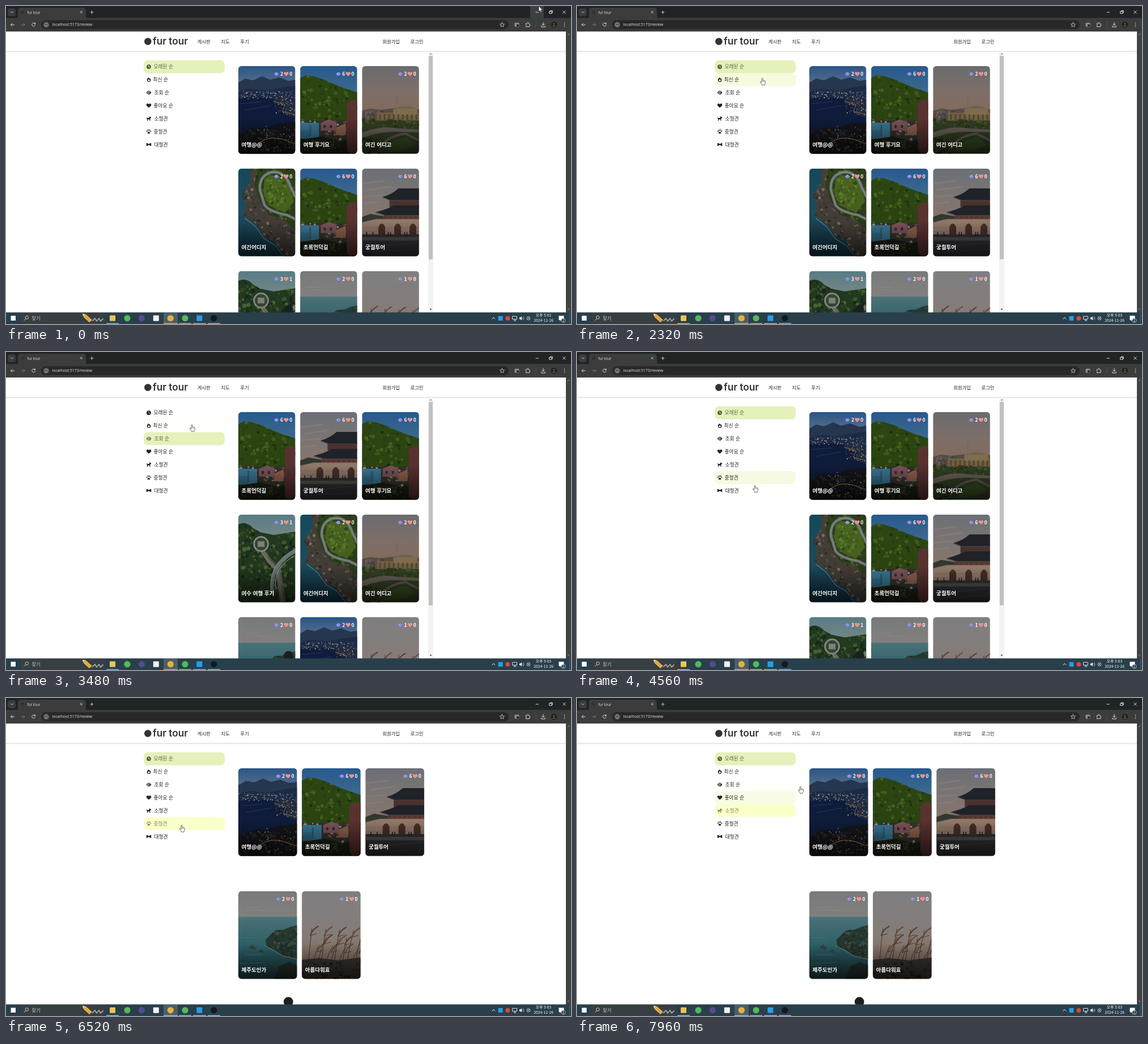
Recreate the animation shown at these times as an HTML page. Size 997 by 561 pixels, loop 8000 ms.

```html
<!DOCTYPE html>
<html lang="ko">
<head>
<meta charset="utf-8">
<title>fur tour</title>
<style>
html, body { margin: 0; width: 100%; height: 100%; overflow: hidden; background: #fff; }
svg { display: block; }
#stage { width: 100vw; height: 100vh; }
text { font-family: "Noto Sans CJK KR", "Noto Sans CJK", "Noto Sans", sans-serif; white-space: pre; }
.ui { font-family: "Open Sans", "Noto Sans", sans-serif; }
.logo { font-family: Inter, sans-serif; font-weight: 600; }
.line { fill: none; stroke-linecap: round; stroke-linejoin: round; }
</style>
</head>
<body>
<svg id="stage" viewBox="0 0 997 561" preserveAspectRatio="none"></svg>
<script>
const LOOP = 8000, CARD_H = 154.6, SCENE_W = 104;
const stage = document.getElementById('stage');

const rect = (x, y, w, h, fill, r = 0, more = '') =>
  `<rect x="${x}" y="${y}" width="${w}" height="${h}" rx="${r}" fill="${fill}" ${more}/>`;
const dot = (x, y, r, fill, more = '') => `<circle cx="${x}" cy="${y}" r="${r}" fill="${fill}" ${more}/>`;
const path = (d, fill, more = '') => `<path d="${d}" fill="${fill}" ${more}/>`;
const line = (d, color, w = 1, more = '') => `<path class="line" d="${d}" stroke="${color}" stroke-width="${w}" ${more}/>`;
const text = (s, x, y, size, fill, more = '') => `<text x="${x}" y="${y}" font-size="${size}" fill="${fill}" ${more}>${s}</text>`;
const at = (x, y, s, scale = 1) => `<g transform="translate(${x} ${y}) scale(${scale})">${s}</g>`;
const fade = (id, ...stops) => `<linearGradient id="${id}" x1="0" y1="0" x2="0" y2="1">` +
  stops.map(([o, c, a = 1]) => `<stop offset="${o}" stop-color="${c}" stop-opacity="${a}"/>`).join('') + '</linearGradient>';

function random(seed) {
  return () => (seed = (seed * 16807) % 2147483647) / 2147483647;
}
function specks(n, x, y, w, h, colors, size, seed) {
  const rnd = random(seed * 7919);
  let s = '';
  for (let i = 0; i < n; i++) {
    const px = x + rnd() * w, py = y + rnd() * h, r = size * (0.5 + rnd());
    s += dot(px.toFixed(1), py.toFixed(1), r.toFixed(1), colors[Math.floor(rnd() * colors.length)]);
  }
  return s;
}
// A filled outline whose texture stays inside it
const textured = (id, d, fill, body) =>
  path(d, fill) + `<clipPath id="${id}"><path d="${d}"/></clipPath><g clip-path="url(#${id})">${body}</g>`;

// ---- photo scenes, 104 x 155 ----
const lights = ['#b98a4a', '#d8b878', '#8a6436', '#7f8ba0'];
const leaves = ['#26400f', '#3f5d1b', '#2e4a12', '#1b300e', '#4a6420'];
const scenes = {
  night: rect(0, 0, 104, 155, 'url(#nightSky)') +
    path('M0 30L14 22L28 25L44 18L58 24L74 20L90 26L104 24V60H0Z', '#26374f') +
    path('M0 44L22 40L50 43L78 38L104 34V62H0Z', '#1d2b47') +
    path('M0 58Q30 52 62 57L104 62V155H0Z', '#0f1d3d') +
    specks(110, 0, 43, 104, 15, ['#5d6f8c', '#8893a5', '#a9875a', '#3c4c6a', '#c9b389'], .8, 3) +
    path('M64 58H104V92L82 84L86 72L64 66Z', '#222c42') + specks(60, 66, 56, 38, 30, lights, .8, 5) +
    line('M64 62L84 68L80 80L104 86', '#a9834c', .8) + line('M6 66L42 63M14 78L58 70', '#2b4166', .8) +
    path('M0 122Q22 104 48 110L70 102L104 98V155H0Z', '#15161b') +
    specks(50, 0, 112, 104, 43, ['#262a30', '#30302f', '#1b222b'], 2.2, 7) +
    specks(90, 28, 104, 76, 46, lights, .7, 9) + line('M32 142Q54 118 88 132T104 120', '#b4833f', 1.1),
  village: rect(0, 0, 104, 155, 'url(#blueSky)') +
    textured('hill', 'M0 22L12 16L26 18L44 24L62 32L82 40L104 47V112H0Z', '#2d4612', specks(170, 0, 18, 104, 94, leaves, 2.2, 4)) +
    rect(0, 96, 104, 59, '#34342e') +
    specks(90, 0, 94, 104, 40, ['#74504a', '#8b7d70', '#3a5f6d', '#5a3f32', '#a09689', '#2d3a22'], 2.1, 6) +
    rect(2, 100, 33, 27, '#3c7c99') + rect(2, 113, 17, 15, '#35708f') + rect(18, 104, 3, 20, '#2f6079') +
    path('M38 100L52 94L66 99V114H38Z', '#80565e') + path('M66 108L82 101V122H64Z', '#94644e') +
    rect(43, 104, 4, 5, '#2e3036') + rect(54, 104, 4, 5, '#2e3036') +
    path('M0 130L40 124L72 132L104 128V155H0Z', '#1c2014') + specks(40, 0, 130, 80, 22, ['#33421a', '#4a3a22', '#202818'], 2, 8) +
    rect(84, 60, 24, 95, '#5d3432', 11),
  park: rect(0, 0, 104, 155, 'url(#dusk)') +
    path('M0 79L16 75L34 77L60 74L104 76V100H0Z', '#57504a') + specks(30, 0, 78, 40, 16, ['#6d6257', '#47433f'], 1.6, 11) +
    rect(28, 82, 76, 15, '#766345') + rect(57, 75, 42, 12, '#86714d') + path('M60 75Q78 66 96 75Z', '#6e665b') +
    [...Array(9)].map((_, i) => rect(32 + i * 8, 85, 3, 10, '#574833')).join('') + rect(62, 52, 2, 40, '#776c5f') +
    rect(0, 96, 104, 59, '#364226') + specks(90, 0, 93, 104, 20, ['#2a3719', '#46552c', '#353f22'], 2.2, 12) +
    path('M0 118Q34 104 66 110L104 112V117L68 116Q34 114 0 128Z', '#6d655d') +
    line('M28 155Q36 126 78 119L104 132', '#665d56', 4) + path('M44 146Q54 128 82 126L96 139Q74 152 44 150Z', '#3a5424') +
    specks(55, 0, 128, 32, 26, ['#25301a', '#37451f'], 2.6, 13),
  coast: rect(0, 0, 104, 155, 'url(#sea)') +
    textured('rocks', 'M22 0H104V155H84L66 128L48 120L34 98L12 84L16 62L8 48L24 22Z', '#463f38',
      specks(260, 6, 0, 98, 155, ['#6a5d51', '#3a3632', '#2b2d2c', '#7a6e61', '#333c2a', '#4a4d4b'], 1.9, 16)) +
    textured('wood', 'M36 0H104V112L84 90L56 82L40 58L30 28Z', '#2c3e1c', specks(130, 28, 0, 76, 112, leaves, 2.1, 18)) +
    path('M48 18Q68 4 90 24L100 58L84 78L54 64L46 42Z', '#48641f') +
    specks(60, 54, 20, 34, 46, ['#587726', '#3b581b', '#68802f', '#30491a'], 2.2, 19) +
    line('M104 90L88 82Q56 76 48 64L40 38Q38 14 58 7Q84 2 94 32L104 52', '#6f7475', 5) +
    line('M104 90L88 82Q56 76 48 64L40 38Q38 14 58 7Q84 2 94 32L104 52', '#9a9c96', .7) +
    line('M14 88L32 102L48 124L68 136L82 155', '#8b969a', 1.4, 'opacity=".7"'),
  palace: rect(0, 0, 104, 155, 'url(#cloudy)') +
    line('M0 27L40 22M10 38L52 32M0 50L36 47M4 62L30 59', '#9a857d', 3, 'opacity=".4"') +
    path('M0 86L16 80L40 84V100H0Z', '#343a31') +
    rect(50, 54, 54, 14, '#4c3330') + path('M38 50Q54 46 66 35H104V56H52Z', '#202329') + line('M38 51L52 56H104', '#46464a', 1.2) +
    rect(40, 80, 64, 11, '#543a32') + path('M26 77Q46 72 58 65H104V82H42Z', '#202329') + line('M26 78L42 83H104', '#48484c', 1.2) +
    [...Array(7)].map((_, i) => rect(46 + i * 9, 84, 2, 7, '#7b3d31')).join('') +
    path('M0 95L26 89H104V118H0Z', '#987f6e') + line('M0 96L26 90H104M0 104H104M0 111H104', '#7c685b', .6) +
    [30.5, 58.5, 85.5].map(x => path(`M${x} 118V103Q${x + 6} 91 ${x + 12} 103V118Z`, '#49302a')).join('') +
    rect(0, 116, 104, 39, '#34343a') + path('M0 121H104V127H0Z', '#57534f') + line('M0 140L104 130M0 148L104 142', '#47474d', 1) +
    [9, 20, 47, 51, 76, 80].map(x => rect(x, 112, 1.7, 7, '#20232a', .8)).join(''),
  bridge: rect(0, 0, 104, 155, 'url(#haze)') +
    textured('forest', 'M0 18Q16 10 28 24L40 31L64 36L104 30V155H0Z', '#24391f',
      specks(220, 0, 14, 104, 141, ['#2f4c25', '#1c311c', '#3c5a2d', '#16271a', '#476636'], 2.6, 23)) +
    line('M44 64L56 82L72 98L80 155', '#6f6963', 6) + line('M43 66L54 84L69 100L76 155M48 64L60 80L76 96L85 155', '#9a9995', .8) +
    dot(42, 52, 12.5, '#34482f', 'stroke="#85898a" stroke-width="3"') + rect(36, 47, 12, 10, '#81837c') +
    line('M62 138Q56 88 104 64', '#6f7677', 6) + line('M60 138Q52 86 104 60M68 132Q62 92 104 71', '#a2a6a5', 1),
  cliff: rect(0, 0, 104, 155, 'url(#greySky)') +
    rect(0, 45, 104, 110, 'url(#teal)') + line('M0 45H104', '#768586', 1) + line('M22 33L56 34M14 29L38 28', '#8c8a88', 1) +
    textured('cliffs', 'M104 60L92 63L80 68L66 69L58 76L48 86L50 99L66 105L78 113L104 120Z', '#263a31',
      specks(110, 46, 60, 58, 60, ['#1e3028', '#344a38', '#4a4a42', '#20302c'], 2, 27)) +
    line('M47 96L64 105L78 114L104 120', '#667c7b', 1.5) +
    path('M18 99L25 94L32 101L26 104ZM34 107L42 102L46 109Z', '#3b4442') + path('M64 155L72 133L90 125L104 131V155Z', '#27332e') +
    line('M0 82H30M12 112H42M4 128L48 126', '#44777b', 1),
  reeds: rect(0, 0, 104, 155, 'url(#rose)') +
    path('M0 121L30 118L64 122L104 117V155H0Z', '#3d3834') +
    [...Array(13)].map((_, i) => {
      const x = 10 + i * 7.5, top = 66 + (i * 29) % 43, bend = 8 + (i * 5) % 13;
      return line(`M${x} 155Q${x + 2} 114 ${x + bend} ${top}`, '#40312a', .9) +
        line(`M${x + bend - 3} ${top + 12}Q${x + bend} ${top + 2} ${x + bend + 11} ${top - 4}`, i % 2 ? '#6c4d3c' : '#574135', 2.2) +
        line(`M${x + bend - 3} ${top + 12}L${x + bend + 8} ${top + 9}`, '#64483a', 1.2);
    }).join('') + specks(60, 0, 126, 104, 29, ['#2a2522', '#463a32', '#1f1e1d'], 2, 31)
};

const WIDE = 100.2, NARROW = 103.4;
const clipId = w => 'card' + Math.round(w);
const defs = fade('nightSky', [0, '#2a5586'], [.2, '#566f8f'], [.4, '#1b2c50'], [1, '#101524']) +
  fade('blueSky', [0, '#27598d'], [.35, '#426f92']) +
  fade('dusk', [0, '#6a6b6e'], [.3, '#80716b'], [.55, '#8a6f5d']) +
  fade('cloudy', [0, '#6b6f76'], [.3, '#7d7876'], [.6, '#8f7a6f']) +
  fade('sea', [0, '#16485a'], [.5, '#1e4e60'], [1, '#143849']) +
  fade('haze', [0, '#577c84'], [.25, '#76898a']) +
  fade('greySky', [0, '#777a7b'], [.3, '#858381']) +
  fade('teal', [0, '#4c757b'], [.5, '#2d626a'], [1, '#22474c']) +
  fade('rose', [0, '#7f7f80'], [.5, '#8a817d'], [.8, '#8b7265']) +
  fade('shade', [0, '#000', 0], [.6, '#000', .05], [1, '#000', .65]) +
  fade('drop', [0, '#000', .16], [1, '#000', 0]) +
  [WIDE, NARROW].map(w => `<clipPath id="${clipId(w)}">${rect(0, 0, w, CARD_H, '#000', 5.5)}</clipPath>`).join('') +
  Object.entries(scenes).map(([id, s]) => `<g id="${id}">${s}</g>`).join('');

// ---- small icons, centred on 0,0 ----
const heart = c => path('M0 4L-4 .2C-5.4-1.6-3.8-4.4-1.5-3.8Q-.5-3.5 0-2.6Q.5-3.5 1.5-3.8C3.8-4.4 5.4-1.6 4 .2Z', c);
const eye = (c, hole) => path('M-4.6 0Q0-7 4.6 0Q0 7-4.6 0Z', c) + dot(0, 0, 2.3, hole) + dot(.3, .2, 1.5, c);
const menuIcons = [
  dot(0, 0, 4.1, 'currentColor') + line('M0-2.4V.2L1.6 1.4', '#fff', .9),
  path('M-.7-4.2Q.5-3 1-2L2-3Q3.7-1 3.5 1Q3 4.2 0 4.2T-3.5 1Q-3.6-1.4-.7-4.2Z', 'currentColor') + path('M-.2-1.3L1 .3L1.6-.3Q2.4 2.9 0 2.9T-1.5 .9Z', '#fff'),
  eye('currentColor', '#fff'),
  heart('currentColor'),
  path('M1-4.2L2.2-3.2L4.6-2.4L4-1L2.6-.6V4H1.3V1.4H-2V4H-3.3V.6L-4.4-1.7L-3.8-2.2L-2.6-1.2H.4Z', 'currentColor'),
  path('M0-.3Q3.6 2.6 2 3.7Q.8 4 0 3.4Q-.8 4-2 3.7Q-3.6 2.6 0-.3Z', 'currentColor') +
    [[-3.4, -.4], [-1.4, -2.7], [1.4, -2.7], [3.4, -.4]].map(([x, y]) => dot(x, y, 1.1, 'currentColor')).join(''),
  rect(-3, -1.2, 6, 2.4, 'currentColor') + [[-3.2, -1.3], [-3.2, 1.3], [3.2, -1.3], [3.2, 1.3]].map(([x, y]) => dot(x, y, 1.5, 'currentColor')).join('')
];

// ---- review cards: title, scene, views, likes ----
const posts = [
  ['여행@@', 'night', 2, 0], ['여행 후기요', 'village', 6, 0], ['여긴 어디고', 'park', 2, 0],
  ['여긴어디지', 'coast', 2, 0], ['초록언덕길', 'village', 6, 0], ['궁궐투어', 'palace', 6, 0],
  ['여수 여행 후기', 'bridge', 3, 1], ['제주도인가', 'cliff', 2, 0], ['아름다워효', 'reeds', 1, 0]
];
function card([title, scene, views, likes], x, y, w) {
  const bold = 'font-weight="700"', end = bold + ' text-anchor="end"';
  return at(x, y, rect(-.4, .2, w + .8, CARD_H + .4, '#bbb', 6, 'opacity=".35"') +
    `<g clip-path="url(#${clipId(w)})"><use href="#${scene}" x="${(w - SCENE_W) / 2}"/>${rect(0, 0, w, CARD_H, 'url(#shade)')}</g>` +
    at(w - 33, 14, eye('#7f80df', '#b5b5ee'), .95) + text(views, w - 21.3, 17, 8.5, '#fff', end) +
    at(w - 15.7, 14, heart('#f28f8f'), .95) + text(likes, w - 5, 17, 8.5, '#fff', end) +
    text(title, 5.5, 142, 9.5, '#fff', bold));
}
const wide = list => list.map((p, i) => card(posts[p], 410 + i % 3 * 109.25, 106 + Math.floor(i / 3) * 180.8, WIDE)).join('') +
  rect(745, 80, 9, 461, '#f3f3f3') + rect(746, 88, 7, 359, '#c1c1c1') +
  path('M747.5 85.5L749.5 83L751.5 85.5Z', '#888') + path('M747.5 534L749.5 536.5L751.5 534Z', '#444');
const narrow = list => list.map((p, i) => card(posts[p], 410 + i % 3 * 112.2, 124 + Math.floor(i / 3) * 216.8, NARROW)).join('');
const views = {
  oldest: wide([0, 1, 2, 3, 4, 5, 6, 7, 8]),
  newest: wide([8, 7, 6, 5, 4, 3, 2, 1, 0]),
  seen: wide([4, 5, 1, 6, 3, 2, 7, 0, 8]),
  sized: narrow([0, 4, 5, 7, 8])
};

// ---- side menu ----
const menu = [['오래된 순', 260.5], ['최신 순', 259.5], ['조회 순', 261.5], ['좋아요 순', 260.5], ['소형견', 261.5], ['중형견', 260.5], ['대형견', 261.5]];
const ROW = 22.85, rowY = i => 95.8 + i * ROW;
const menuSvg = menu.map((_, i) => rect(243, rowY(i), 143, ROW, '#fff', 7.5, 'class="bg"')).join('') +
  menu.map(([s, x], i) => `<g class="label">${at(252, rowY(i) + 11.4, menuIcons[i], .95)}${text(s, x, rowY(i) + 14.6, 8.7, 'currentColor')}</g>`).join('');

// ---- browser and desktop ----
const pale = '#d5d7d8';
const browser = rect(0, 0, 997, 22, '#202424') + rect(925, 0, 24, 21, '#3b4040', 0, 'id="min"') +
  rect(3, 4, 14, 14, '#393d3d', 4) + line('M8.5 10L10.5 12L12.5 10', pale) +
  path('M17 22Q21 22 21 18V8Q21 3 26 3H136Q141 3 141 8V18Q141 22 145 22Z', '#3c3c3c') +
  dot(29.5, 11, 3, '#303333') + text('fur tour', 37.5, 13.5, 6.4, '#e8e8e8', 'class="ui"') +
  line('M131 9L134.5 12.5M134.5 9L131 12.5M149 11H154M151.5 8.5V13.5', pale, .9) +
  line('M935 11H939.5M982.7 8.5L987.3 13M987.3 8.5L982.7 13M959 9.5H963V13.2H959ZM960.3 9.3V8.2H964.3V12H963.2', '#eee', .9) +
  rect(0, 21, 997, 24, '#3c3c3c') + rect(62, 25, 825, 16, '#282828', 8) +
  line('M14.5 33H8.5M11 30.5L8.5 33L11 35.5', pale) + line('M27 33H33M30.5 30.5L33 33L30.5 35.5', '#777') +
  line('M51.3 31.2A3 3 0 1 0 51.5 34M51.5 29.8V31.7H49.5', pale) +
  dot(71, 33, 6, '#3c3c3c') + line('M71 32.8V35M71 31V31.1', pale, .9) + dot(71, 33, 3.3, 'none', `stroke="${pale}" stroke-width=".8"`) +
  text('localhost:5173/review', 81.5, 35.4, 7, '#e6e6e6', 'class="ui"') +
  line('M875.5 29L876.7 31.7L879.6 32L877.4 33.9L878 36.7L875.5 35.2L873 36.7L873.6 33.9L871.4 32L874.3 31.7Z', pale, .8) +
  rect(897.5, 29.5, 8, 7, '#8b8f90', 1) + rect(901, 32.5, 4, 3.5, '#252525') +
  line('M917.5 31H919.6Q919.6 29.2 921 29.2T922.4 31H923.5V32.5Q925 32.6 925 33.8T923.5 35V36.5H917.5V34.8Q919 33.7 917.5 32.5Z', pale) +
  line('M935 28V38', '#5a5a5a', .8) + line('M948 29V34M945.8 32L948 34.2L950.2 32M944.8 35V37H951.2V35', pale) +
  dot(967, 33, 5.2, '#1d211a') + dot(967, 31.6, 1.6, '#5c623a') + path('M963.8 36.4Q967 31.5 970.2 36.4Z', '#5c623a') +
  [30, 33, 36].map(y => dot(985.5, y, .8, pale)).join('');
const page = rect(0, 45, 988, 496, '#fff') + rect(0, 79.5, 988, 2.5, 'url(#drop)') +
  rect(988, 45, 9, 496, '#424242') + path('M990.5 51L992.5 48.5L994.5 51Z', '#777') + path('M990.5 534L992.5 536.5L994.5 534Z', '#777') +
  dot(250.3, 62.5, 6.3, '#333') + text('fur tour', 259, 67.5, 17.2, '#333', 'class="logo"') +
  [['게시판', 337.7], ['지도', 379.3], ['후기', 413.3], ['회원가입', 664.3], ['로그인', 713.5]]
    .map(([s, x]) => text(s, x, 65.8, 8.35, '#222', 'font-weight="500"')).join('');
const mark = (x, c, round) => round ? dot(x, 550.8, 5.6, c) : rect(x - 5, 545.8, 10, 10, c, 1);
const taskbar = rect(0, 540.5, 997, 20.5, '#293f4b') + rect(8.5, 546.5, 8.5, 8.5, '#fff') +
  rect(25.5, 541, 149, 20, '#373f42') + dot(36.8, 549.4, 2.7, 'none', 'stroke="#ddd" stroke-width=".9"') + line('M34.9 551.5L32 554.5', '#ddd', .9) +
  text('찾기', 45.3, 553.7, 8.4, '#c8cccd') +
  path('M135 543L141 544L152 554L147 558L137 549Z', '#e5b34c') + path('M135 543L139 543.7L136 547Z', '#f5dfb4') + line('M139 546L149 556', '#b9812f', .9) +
  line('M153 555L157 551L160 556L164 551L167 556L171 552', '#9ca5a8', 1.8) +
  rect(278, 541, 25, 20, '#4b5e68') +
  mark(188, '#f0c453') + mark(214, '#55b957', 1) + mark(239.3, '#554b8d', 1) + mark(264.8, '#f2f2f2') +
  mark(290.3, '#e5b23c', 1) + mark(316, '#55b957', 1) + mark(341.3, '#2d9be5') + mark(366.8, '#15191b', 1) +
  [[177, 22], [278, 25], [305, 22], [330, 23], [356, 22]].map(([x, w]) => rect(x, 559.5, w, 1.5, '#76b9ed')).join('') +
  line('M857.8 552L860.3 549.5L862.8 552', '#fff') + rect(868.5, 547, 8, 8, '#2c9be0') + dot(885.3, 551, 4, '#d6493e') +
  line('M894 547.5H901.5V552.5H894ZM896 555H900M898 552.5V555', '#eee', .9) +
  path('M905.8 549.5H907.5L910 547.5V554.5L907.5 552.5H905.8Z', '#eee') + line('M911.3 549.5Q912.5 551 911.3 552.5M913 548Q915 551 913 554', '#ccc', .7) +
  dot(922, 551, 3, 'none', 'stroke="#ddd" stroke-width=".8"') + line('M920.8 549.8L923.2 552.2M923.2 549.8L920.8 552.2', '#ddd', .8) +
  text('', 948.5, 548.3, 6.8, '#fff', 'id="clock" text-anchor="middle"') +
  text('2024-11-26', 948.7, 557.4, 6.8, '#fff', 'text-anchor="middle"') +
  path('M975.5 546.5H984.5V554H979.5L977.5 556V554H975.5Z', '#fff') + dot(983.5, 554.7, 3.7, '#293f4b', 'stroke="#fff" stroke-width=".6"') +
  text('1', 983.5, 556.9, 5.8, '#fff', 'text-anchor="middle"') + rect(994, 541, .6, 20, '#6b7980');

const arrow = path('M0 0V10L2.3 7.9L3.8 11.2L5.4 10.5L4 7.3H7Z', '#fff', 'stroke="#222" stroke-width=".7"');
const hand = at(1, .6, path('M-1 1Q-1-.3 0-.3T1 1V4.2Q1.3 3.4 2.2 4Q2.6 3.5 3.6 4.3Q4 3.8 4.9 4.8Q5.6 5.6 5.2 8.2Q4.9 9.6 4.2 10.2V11.7H-.8V10.4Q-2.4 8.7-3.8 6.4Q-3.4 5-2 6L-1 7.2Z',
  '#fff', 'stroke="#333" stroke-width=".7" stroke-linejoin="round"') + line('M1 4.2V6M2.8 4.5V6.2M4.3 5V6.4', '#444', .4));

stage.innerHTML = `<defs>${defs}</defs>` + page + menuSvg +
  Object.entries(views).map(([id, s]) => `<g class="view" data-id="${id}">${s}</g>`).join('') +
  dot(498.3, 536, 8.4, '#1b201f') + browser + taskbar +
  `<g id="cursor"><g id="arrow">${arrow}</g><g id="hand">${hand}</g></g>`;

// ---- timeline ----
const track = [
  [0, 940, 0], [520, 940, 0], [720, 800, 52], [940, 520, 140], [1080, 380, 136], [1260, 342, 126], [1320, 338, 112],
  [1600, 334, 107], [2000, 326, 126], [2680, 326, 128], [2920, 326, 128], [3080, 328, 150], [3460, 328, 146],
  [3480, 327, 128], [3640, 326, 108], [3840, 325, 108], [4300, 315, 213], [4530, 313, 231], [4560, 313, 235],
  [4760, 313, 243], [5280, 313, 243], [5680, 309, 224], [6920, 309, 224], [7200, 312, 202], [7560, 318, 197],
  [7700, 328, 180], [7920, 376, 168], [7960, 393, 156], [8000, 402, 150]
];
// time, sort row, size row, view
const states = [
  [0, 0, -1, 'oldest'], [2480, 1, -1, 'newest'], [3120, 2, -1, 'seen'], [3680, 0, -1, 'oldest'],
  [4840, 0, 6, 'sized'], [5760, 0, 5, 'sized'], [7240, 0, 4, 'sized']
];
const HOVER_MS = 200, SAMPLES = 10;

function pointer(t) {
  t = Math.max(0, t);
  const i = Math.max(1, track.findIndex(k => k[0] > t));
  const [t0, x0, y0] = track[i - 1], [t1, x1, y1] = track[i];
  const p = (t - t0) / (t1 - t0);
  return [x0 + (x1 - x0) * p, y0 + (y1 - y0) * p];
}
// Share of the last moments the pointer spent on each row
function hoverLevels(t) {
  const levels = menu.map(() => 0);
  for (let i = 0; i < SAMPLES; i++) {
    const [x, y] = pointer(t - i * HOVER_MS / SAMPLES);
    const row = Math.floor((y - rowY(0)) / ROW);
    if (x > 243 && x < 386 && row >= 0 && row < menu.length) levels[row] += 1 / SAMPLES;
  }
  return levels;
}

const $ = id => document.getElementById(id);
const bgs = [...document.querySelectorAll('.bg')], labels = [...document.querySelectorAll('.label')];
const viewNodes = [...document.querySelectorAll('.view')];
const show = (node, on) => node.style.display = on ? '' : 'none';

function draw(t) {
  const [, sort, size, view] = states.filter(s => s[0] <= t).pop();
  const levels = hoverLevels(t);
  menu.forEach((_, i) => {
    const picked = i === sort || i === size;
    bgs[i].setAttribute('fill', i === sort ? '#e4f1bb' : i === size ? '#fbffc9' : '#f7fadf');
    bgs[i].setAttribute('opacity', picked ? 1 : levels[i]);
    labels[i].style.color = i === sort ? '#59633c' : i === size ? '#85876b' : '#222';
    labels[i].setAttribute('font-weight', picked ? 500 : 400);
  });
  viewNodes.forEach(n => show(n, n.dataset.id === view));
  const [x, y] = pointer(t);
  const onMenu = x > 243 && x < 400 && y > 95 && y < 256;
  $('cursor').setAttribute('transform', `translate(${x} ${y})`);
  show($('hand'), onMenu);
  show($('arrow'), !onMenu);
  show($('min'), t < 560);
  $('clock').textContent = t < 1760 ? '오후 5:02' : '오후 5:03';
}

const start = performance.now();
function tick() {
  draw((performance.now() - start) % LOOP);
  requestAnimationFrame(tick);
}
tick();
</script>
</body>
</html>
```
